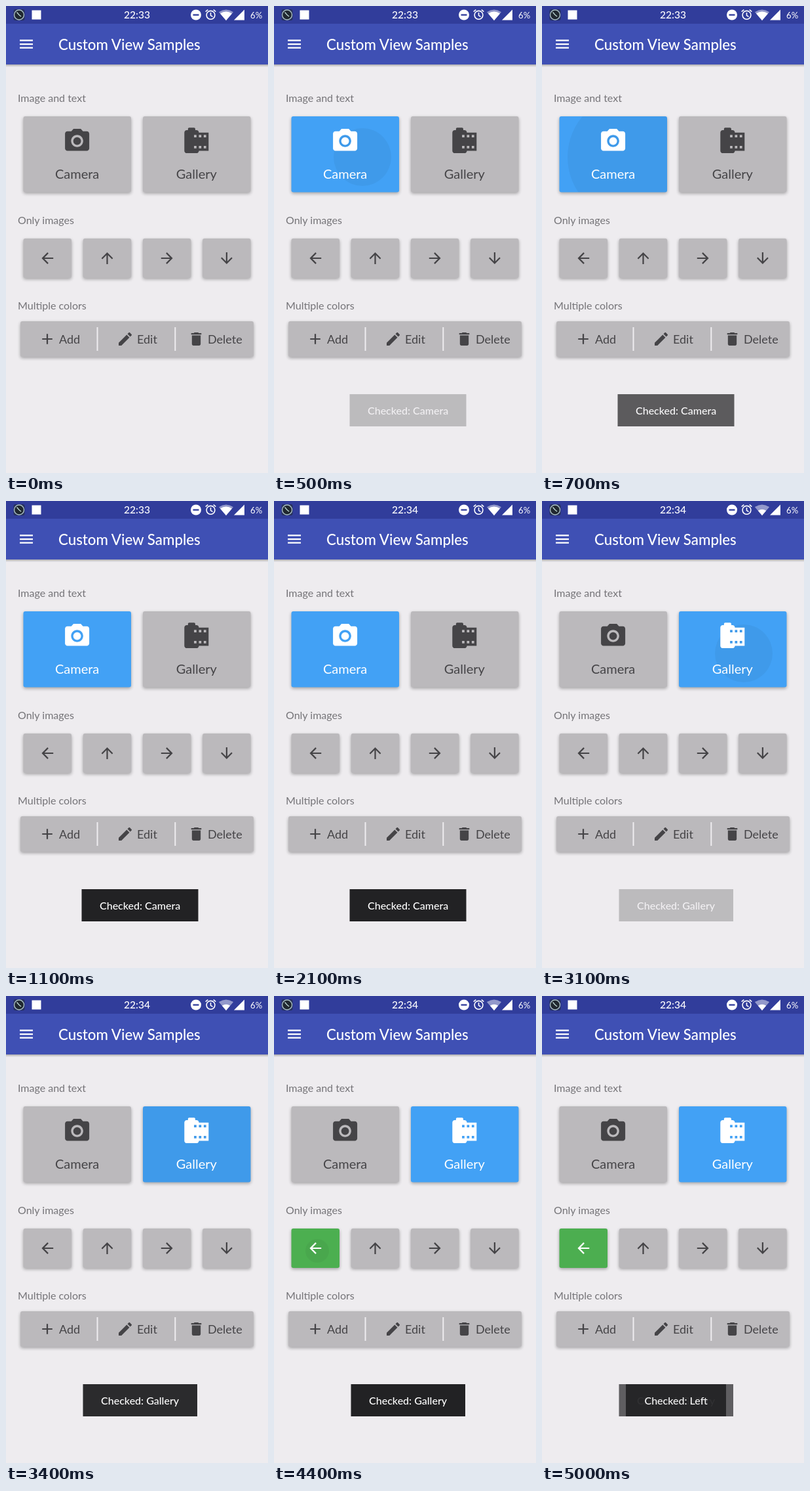
Write an HTML page that moves like this. It is 400x711 px and loops after 5100 ms.

```html
<!DOCTYPE html>
<html lang="en">
<head>
<meta charset="utf-8">
<title>Custom View Samples</title>
<style>
html, body { margin: 0; width: 100%; height: 100%; overflow: hidden; background: #eeecef; }
svg { display: block; width: 100%; height: 100%; font-family: Lato, "Open Sans", sans-serif; }
.label { font-size: 16px; fill: #757478; }
.big { font-size: 20px; text-anchor: middle; }
.mid { font-size: 18px; }
.toast { font-size: 16px; font-weight: 500; fill: #fff; text-anchor: middle; }
</style>
</head>
<body>
<svg id="stage" viewBox="0 0 400 711">
  <defs>
    <filter id="soft" x="-20%" y="-30%" width="140%" height="170%"><feGaussianBlur stdDeviation="2.4"/></filter>
    <linearGradient id="drop" x1="0" y1="0" x2="0" y2="1">
      <stop offset="0" stop-opacity=".34"/><stop offset="1" stop-opacity="0"/>
    </linearGradient>
  </defs>
  <rect width="400" height="711" fill="#eeecef"/>
  <rect y="88" width="400" height="5" fill="url(#drop)"/>
  <rect width="400" height="89" fill="#3f50b4"/>
  <rect width="400" height="27" fill="#313d9b"/>

  <g id="status" fill="#fff">
    <rect x="11.500" y="5" width="17" height="17" rx="3" fill="#27315c"/>
    <circle cx="20" cy="13.500" r="7.500" fill="#20282f" stroke="#a9bfc6" stroke-width="1.400"/>
    <path d="M16.500 9.500L20 13.500L23 16" fill="none" stroke="#b9d2d0" stroke-width="1.400"/>
    <rect x="39.500" y="6.500" width="14" height="14"/>
    <text id="time" x="180" y="19.300" font-size="15.600" font-weight="500">22:33</text>
    <circle cx="290" cy="13.500" r="8"/>
    <rect x="285.500" y="12.400" width="9" height="2.300" fill="#313d9b"/>
    <g fill="none" stroke="#fff" stroke-width="1.600">
      <circle cx="312.500" cy="13.800" r="6.400"/>
      <path d="M312.500 10v4.300l3 2M304.700 8.600l3.600-3M320.300 8.600l-3.600-3"/>
    </g>
    <path d="M336 22L325 9.200Q336 1.800 347 9.200Z" opacity=".48"/>
    <path id="wifi"/>
    <path d="M348 21.500H364V5.500Z"/>
    <text x="373" y="18.500" font-size="13.200">6%</text>
  </g>

  <path transform="translate(17.700 44.700) scale(1.111)" fill="#fff" d="M3 18h18v-2H3v2zm0-5h18v-2H3v2zm0-7v2h18V6H3z"/>
  <text x="80" y="66.500" font-size="22.300" font-weight="500" fill="#fff">Custom View Samples</text>
  <text class="label" x="18" y="146">Image and text</text>
  <text class="label" x="18" y="332">Only images</text>
  <text class="label" x="18" y="462">Multiple colors</text>
  <g id="buttons"></g>
  <g id="toasts"></g>
</svg>
<script>
const LOOP = 5100, STEP = 100, GREY = "#bbb9bc", INK = "#454447";
const BLUE = "#42a1f5", GREEN = "#4caf50";
const $ = id => document.getElementById(id);
const clamp = v => Math.max(0, Math.min(1, v));

function add(parent, tag, attrs, text) {
  const el = document.createElementNS("http://www.w3.org/2000/svg", tag);
  for (const k in attrs) el.setAttribute(k, attrs[k]);
  if (text) el.textContent = text;
  parent.appendChild(el);
  return el;
}
const set = (el, attrs) => { for (const k in attrs) el.setAttribute(k, attrs[k]); };

const ICON = {
  camera: "M9 2L7.17 4H4c-1.1 0-2 .9-2 2v12c0 1.1.9 2 2 2h16c1.1 0 2-.9 2-2V6c0-1.1-.9-2-2-2h-3.17L15 2H9zm3 15c-2.76 0-5-2.24-5-5s2.24-5 5-5 5 2.24 5 5-2.24 5-5 5zM12 8.800a3.200 3.200 0 1 0 0 6.400a3.200 3.200 0 1 0 0-6.400z",
  roll: "M14 5c0-1.1-.9-2-2-2h-1V2c0-.55-.45-1-1-1H6c-.55 0-1 .45-1 1v1H4c-1.1 0-2 .9-2 2v15c0 1.1.9 2 2 2h8c1.1 0 2-.9 2-2h8V5h-8zm-2 13h-2v-2h2v2zm0-9h-2V7h2v2zm4 9h-2v-2h2v2zm0-9h-2V7h2v2zm4 9h-2v-2h2v2zm0-9h-2V7h2v2z",
  arrow: "M20 11H7.83l5.59-5.59L12 4l-8 8 8 8 1.41-1.41L7.83 13H20v-2z",
  plus: "M19 13h-6v6h-2v-6H5v-2h6V5h2v6h6v2z",
  pencil: "M3 17.25V21h3.75L17.81 9.94l-3.75-3.75L3 17.25zM20.71 7.04c.39-.39.39-1.02 0-1.41l-2.34-2.34c-.39-.39-1.02-.39-1.41 0l-1.83 1.83 3.75 3.75 1.83-1.83z",
  bin: "M6 19c0 1.1.9 2 2 2h8c1.1 0 2-.9 2-2V7H6v12zM19 4h-3.5l-1-1h-5l-1 1H5v2h14V4z"
};

function icon(parent, name, x, y, scale, turn = 0) {
  add(parent, "path", { d: ICON[name],
    transform: `translate(${x} ${y}) rotate(${turn}) scale(${scale}) translate(-12 -12)` });
}

let count = 0;
function button(x, y, w, h) {
  const box = { x, y, width: w, height: h, rx: 3 }, id = "clip" + count++;
  const g = add($("buttons"), "g", {});
  add(g, "rect", { ...box, y: y + 2, opacity: .32, filter: "url(#soft)" });
  const face = add(g, "rect", { ...box, fill: GREY });
  add(add(g, "clipPath", { id }), "rect", box);
  const ripple = add(g, "circle", { opacity: 0, "clip-path": `url(#${id})` });
  return { face, ripple, ink: add(g, "g", { fill: INK }) };
}

const camera = button(26.5, 168, 164.5, 115.5);
icon(camera.ink, "camera", 108.6, 205.6, 1.85);
add(camera.ink, "text", { class: "big", x: 108.6, y: 263 }, "Camera");

const gallery = button(209, 168, 164.5, 115.5);
icon(gallery.ink, "roll", 290.8, 205.6, 1.85);
add(gallery.ink, "text", { class: "big", x: 290.8, y: 263 }, "Gallery");

const arrows = [0, 90, 180, 270].map((turn, i) => {
  const x = 26.5 + i * 91.2, b = button(x, 354, 73.5, 60);
  icon(b.ink, "arrow", x + 36.8, 384, 1.111, turn);
  return b;
});

const bar = button(22, 480, 356, 54).ink;
for (const x of [138.5, 257.3]) {
  add(bar, "rect", { x, y: 489, width: 2, height: 36, fill: "#eeecef" });
}
[["plus", 63, 81, "Add"], ["pencil", 182, 200, "Edit"], ["bin", 290.5, 308, "Delete"]]
  .forEach(([name, ix, tx, text]) => {
    icon(bar, name, ix, 507, 1.111);
    add(bar, "text", { class: "mid", x: tx, y: 513.5 }, text);
  });

function toast(name, x, w, start, end) {
  const g = add($("toasts"), "g", {});
  add(g, "rect", { x, y: 591, width: w, height: 49, fill: "#222224" });
  add(g, "text", { class: "toast", x: 204.6, y: 622 }, "Checked: " + name);
  return { g, start, end };
}
const toasts = [
  toast("Camera", 115.5, 178, 400, 2600),
  toast("Gallery", 117.5, 174.5, 3000, 4870),
  toast("Left", 128, 153, 4610, 9999)
];

function check(b, on, color) {
  set(b.face, { fill: on ? color : GREY });
  set(b.ink, { fill: on ? "#fff" : INK });
}

function spread(b, cx, cy, age) {
  const fade = age < 0 ? 0 : 1 - clamp((age - 400) / 220);
  set(b.ripple, { cx, cy, r: Math.max(0, 18 + .26 * age), opacity: .045 * fade });
}

function draw(t) {
  check(camera, t >= 400 && t < 2500, BLUE);
  check(gallery, t >= 2500, BLUE);
  check(arrows[0], t >= 4400, GREEN);
  spread(camera, 135, 230, t - 400);
  spread(gallery, 308, 232, t - 3000);
  spread(arrows[0], 66, 388, t - 4400);
  for (const { g, start, end } of toasts) {
    set(g, { opacity: clamp((t - start) / 420) * (1 - clamp((t - end) / 430)) });
  }
  $("time").textContent = t < 1200 ? "22:33" : "22:34";
  set($("wifi"), { d: t < 2200
    ? "M336 22L327 11.500Q336 5.500 345 11.500Z"
    : "M336 22L329.800 14.700Q336 10.600 342.200 14.700Z" });
}

const t0 = performance.now();
function tick(now) {
  const t = Math.max(0, now - t0) % LOOP;
  draw(Math.floor(t / STEP) * STEP);
  requestAnimationFrame(tick);
}
draw(0);
requestAnimationFrame(tick);
</script>
</body>
</html>
```
